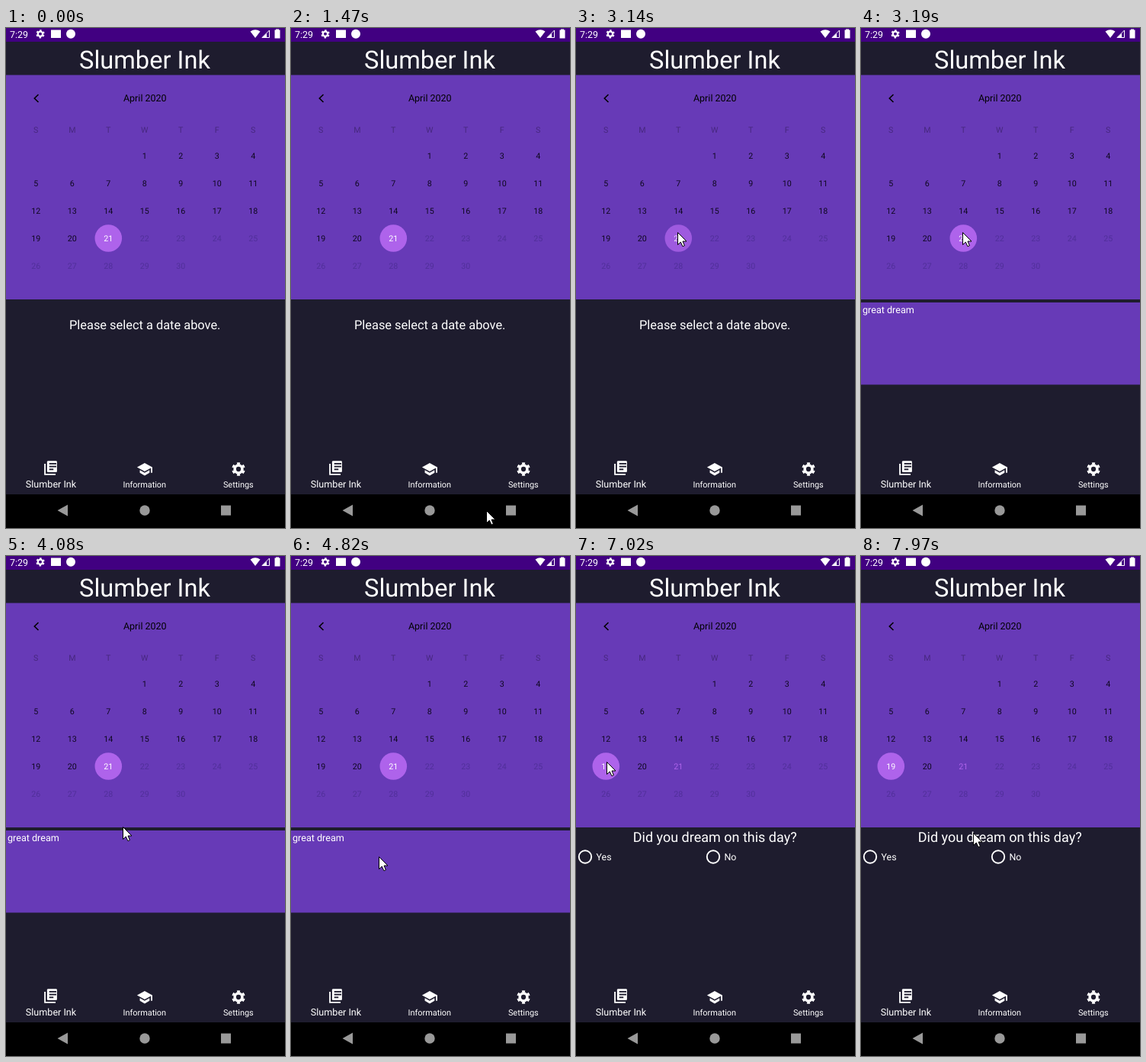
These frames come from a looping animation (366 px wide and 654 px high, 8000 ms). An HTML page:

```html
<!DOCTYPE html>
<html lang="en">
<head>
<meta charset="utf-8">
<style>
  html, body { margin: 0; width: 100%; height: 100%; overflow: hidden; background: #1e1c2e; }
  svg { display: block; width: 366px; height: 654px; }
  text { font-family: Roboto, sans-serif; text-rendering: geometricPrecision; }
</style>
</head>
<body>
<svg id="stage" viewBox="0 0 366 654" fill="#fff"></svg>
<script>
const LOOP = 8000, STEP = 50;
const NIGHT = '#1e1c2e', PURPLE = '#673ab7', LILAC = '#ae63eb', INK = '#0f0820', FADED = '#51309a';
const APP = 'Slumber Ink';

const text = (s, x, y, size, fill = '#fff', anchor = 'middle', extra = '') =>
  `<text x="${x}" y="${y}" font-size="${size}" fill="${fill}" text-anchor="${anchor}" ${extra}>${s}</text>`;
const rect = (x, y, w, h, fill = '#fff', rx = 0) =>
  `<rect x="${x}" y="${y}" width="${w}" height="${h}" fill="${fill}" rx="${rx}"/>`;
const disc = (x, y, r, fill = '#fff', id = '') => `<circle id="${id}" cx="${x}" cy="${y}" r="${r}" fill="${fill}"/>`;
const ring = (x, y, r, w, extra = '') =>
  `<circle cx="${x}" cy="${y}" r="${r}" fill="none" stroke="#fff" stroke-width="${w}" ${extra}/>`;
const path = (d, extra = '') => `<path d="${d}" ${extra}/>`;
const line = (d, colour, w) => path(d, `fill="none" stroke="${colour}" stroke-width="${w}"`);
const group = (body, extra) => `<g ${extra}>${body}</g>`;
const icon = (x, y, scale, body) => group(body, `transform="translate(${x} ${y}) scale(${scale})"`);

const gear = (x, y, scale) => icon(x, y, scale,
  ring(0, 0, 5.4, 3.9) + ring(0, 0, 8.2, 3, 'pathLength="12" stroke-dasharray="1 1" stroke-dashoffset="-.5"'));
const pages = icon(48.3, 564.3, .93, path('M4 6H2V22H18V20H4Z') + rect(6, 2, 14, 16, '#fff', 1.5) +
  [10, 10, 6].map((w, i) => rect(9, 5 + 4 * i, w, 2, NIGHT)).join(''));
const cap = icon(171, 566.3, .91, path('M12 3L1 9L12 15L21 10V17H23V9Z') + path('M5 13V17L12 21L19 17V13L12 17Z'));

const column = c => 39.3 + 47.5 * c;
const dayX = d => column((d + 2) % 7);
const dayY = d => 167 + 36 * Math.floor((d + 2) / 7);
const day = d => text(d, dayX(d), dayY(d) + 4, 10.7, d > 21 ? FADED : INK, 'middle', `id="day${d}"`);
const radio = (x, label) => ring(x, 393.5, 8.2, 1.9) + text(label, x + 14.5, 398, 12.45, '#fff', 'start');

const statusBar = rect(0, 0, 366, 18, '#410081') + text('7:29', 5, 12.5, 12.45, '#fff', 'start') +
  gear(45, 7.8, .58) + rect(59, 2.5, 13, 10.5) + disc(85, 7.8, 6) +
  path('M320.5 4.5Q327 0 333.5 4.5L327 13Z') +
  line('M345.5 3V12.5H336Z', '#fff', 1) + path('M342 7V13H335.5Z') +
  rect(354, 1.5, 4, 2) + rect(352.5, 2.5, 7, 11);

const calendar = rect(0, 61.5, 366, 293.5, PURPLE) +
  line('M42.5 87L37.3 92L42.5 97', '#000', 1.6) + text('April 2020', 182.3, 96, 12.5, '#000') +
  [...'SMTWTFS'].map((s, c) => text(s, column(c), 137, 10.7, '#47287f')).join('') +
  disc(0, 275, 17.8, LILAC, 'mark') +
  Array.from({ length: 30 }, (_, i) => day(i + 1)).join('');

const panels =
  group(text('Please select a date above.', 182.2, 394, 16.4), 'id="prompt"') +
  group(rect(0, 359, 366, 107.5, PURPLE) + text('great dream', 2, 373, 12.6, '#fff', 'start'), 'id="note"') +
  group(text('Did you dream on this day?', 182.2, 374, 18) + radio(12, 'Yes') + radio(180, 'No'), 'id="question"');

const tabs = pages + cap + gear(305, 577, .91) + text(APP, 59, 601, 12.6) +
  text('Information', 181.8, 601, 10.9) + text('Settings', 304.8, 601, 10.9);

const navBar = rect(0, 610, 366, 44, '#000') + path('M81 623.5V638.5L67.5 631Z', 'fill="#999"') +
  disc(182, 631, 6.7, '#999') + rect(282, 624.5, 13, 13, '#999');

const $ = id => document.getElementById(id);
$('stage').innerHTML = rect(0, 0, 366, 654, NIGHT) + statusBar + text(APP, 182, 53, 32.6) +
  calendar + panels + tabs + navBar +
  path('M.5 .5V16.5L4.3 13L6.9 18.7L9.4 17.6L7 12H12Z', 'id="cursor" stroke="#000"');

// Each pointer move starts where the previous one ended; bend holds Bézier controls.
const entry = [257, 634];
const moves = [
  { start: 1470, end: 2240, to: [150, 389] },
  { start: 2280, end: 2570, to: [131, 262] },
  { start: 2760, end: 2810, to: [133, 267] },
  { start: 3890, end: 4670, to: [81, 369], bend: [[264, 453], [-156, 376]] },
  { start: 4720, end: 4820, to: [115, 393] },
  { start: 5880, end: 6350, to: [39, 265] },
  { start: 6630, end: 6680, to: [40, 269] },
  { start: 7670, end: 7970, to: [147, 362], bend: [[190, 300], [282, 345]] },
];

const ease = u => u * u * (3 - 2 * u);
const mix = (a, b, u) => a.map((v, i) => v + (b[i] - v) * u);
function bezier(points, u) {
  while (points.length > 1) points = points.slice(1).map((p, i) => mix(points[i], p, u));
  return points[0];
}

// The screen refreshes every STEP ms, so the pointer advances in steps.
function pointer(t) {
  const i = moves.findLastIndex(m => t >= m.start);
  if (i < 0) return null;
  const { start, end, to, bend = [] } = moves[i];
  const step = Math.floor((t - start) / STEP + .25) + 1;
  const u = Math.min(1, step * STEP / (end - start + STEP));
  return bezier([i ? moves[i - 1].to : entry, ...bend, to], ease(u));
}

function pressOpacity(t, start) {
  const u = (Math.floor((t - start) / STEP) + 1) / 4;
  return u > 0 && u < 1 ? 1 - .31 * Math.sin(Math.PI * u) : 1;
}

function draw(t) {
  const selected = t < 7020 ? 21 : 19;
  const panel = t < 3190 ? 'prompt' : t < 7020 ? 'note' : 'question';
  for (const id of ['prompt', 'note', 'question']) $(id).style.display = id === panel ? '' : 'none';

  $('mark').setAttribute('cx', dayX(selected));
  $('mark').style.opacity = $('day21').style.opacity = pressOpacity(t, 3040);
  $('day19').style.opacity = pressOpacity(t, 6870);
  $('day21').setAttribute('fill', selected === 21 ? '#fff' : LILAC);
  $('day19').setAttribute('fill', selected === 19 ? '#fff' : INK);

  const p = pointer(t);
  $('cursor').style.display = p ? '' : 'none';
  if (p) $('cursor').setAttribute('transform', `translate(${p.map(Math.round)})`);
}

const origin = performance.now();
function frame() {
  draw((performance.now() - origin) % LOOP);
  requestAnimationFrame(frame);
}
frame();
</script>
</body>
</html>
```
